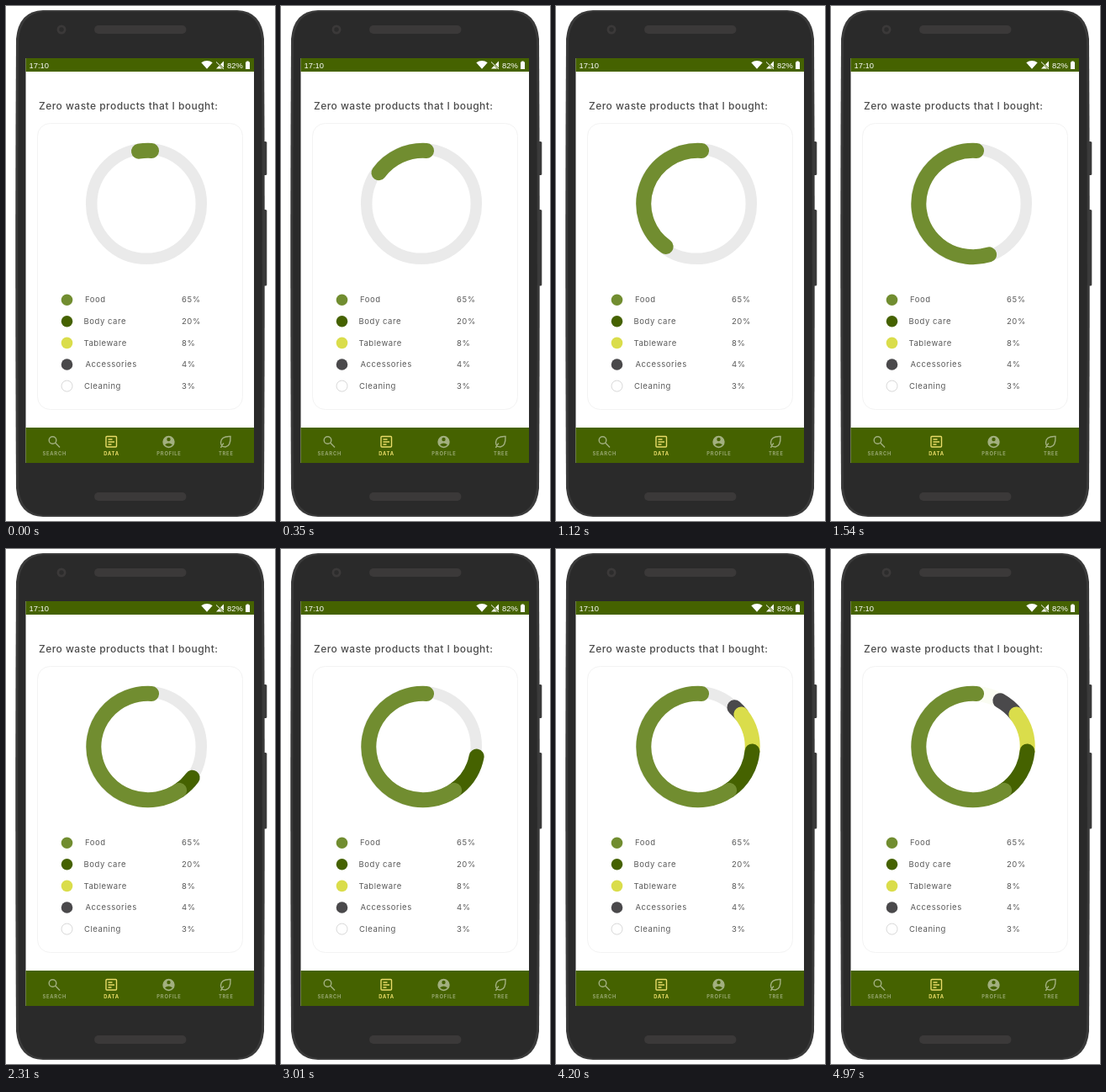
Write an HTML page that moves like this. It is 320 px wide and 612 px high and loops after 5.04 s.

```html
<!DOCTYPE html>
<html lang="en">
<head>
<meta charset="utf-8">
<title>Zero waste chart</title>
<style>
  html, body { margin: 0; width: 100%; height: 100%; overflow: hidden; background: #fff; }
  svg { display: block; width: 100vw; height: 100vh; }
  text { font-family: Inter, sans-serif; }
  .title { font-size: 12px; font-weight: 500; letter-spacing: .47px; fill: #4c4c4c; }
  .row { font-size: 9.5px; letter-spacing: .55px; fill: #5a5a5a; }
  .status text { font: 9.4px "Liberation Sans", Arial, sans-serif; fill: #fff; }
  .nav text { font-size: 5.8px; font-weight: 600; letter-spacing: .8px; text-anchor: middle; }
  .nav g { fill: none; stroke: #a2b07f; stroke-width: 1.4; }
  .nav g.on { stroke: #e9dc68; }
  .nav text, .nav .solid { fill: #a2b07f; stroke: none; }
  .nav .on text { fill: #e9dc68; stroke: none; font-weight: 700; }
  #arcs path { fill: none; stroke-width: 18; stroke-linecap: round; }
</style>
</head>
<body>
<svg viewBox="0 0 320 612">
  <!-- phone -->
  <g fill="#3a3a3a">
    <rect x="304" y="161" width="6.300" height="40" rx="1.500"/>
    <rect x="304" y="242" width="6.300" height="90.500" rx="1.500"/>
    <path d="M44 5H275Q304 6 307 39Q308.500 306 307 573Q304 606 275 607H44Q15 606 12 573Q10.500 306 12 39Q15 6 44 5Z"/>
  </g>
  <path fill="#2a2a2a" d="M45 7H274Q301 8 304 40Q305.500 306 304 572Q301 604 274 605H45Q18 604 15 572Q13.500 306 15 40Q18 8 45 7Z"/>
  <g fill="#3b3939">
    <rect x="105" y="23" width="109.500" height="10" rx="5"/>
    <rect x="105" y="578" width="109.500" height="10" rx="5"/>
    <circle cx="66" cy="28" r="5.500"/>
  </g>
  <circle cx="66" cy="28" r="2.700" fill="#2c2c2c"/>

  <!-- screen -->
  <rect x="23.500" y="62" width="271.500" height="481" fill="#fff"/>
  <path fill="#456200" d="M23.500 62H295V78H23.500ZM23.500 501H295V543H23.500Z"/>
  <g class="status">
    <text x="27.500" y="74">17:10</text>
    <text x="263" y="73.500">82%</text>
    <path fill="#fff" d="M232.300 67.300Q239 62.800 245.700 67.300L239 74.800Z"/>
    <path fill="#fff" d="M259 65.500V74.500H250Z"/>
    <path stroke="#456200" stroke-width="2" d="M250 66L260 76"/>
    <path stroke="#fff" d="M250 66.500L259 75"/>
    <path fill="#fff" d="M286.300 65.500H288.700V66.500H290V75H285V66.500H286.300Z"/>
  </g>

  <text class="title" x="39" y="123">Zero waste products that I bought:</text>
  <rect x="37.500" y="139.500" width="244" height="340" rx="15" fill="#fff" stroke="#f3f3f3"/>

  <!-- chart -->
  <circle cx="167" cy="235" r="65.300" fill="none" stroke="#eaeaea" stroke-width="13.500"/>
  <g id="arcs"></g>
  <g id="legend"></g>

  <!-- navigation -->
  <g class="nav">
    <g><circle cx="55.500" cy="516" r="4.300"/><path d="M58.600 519.100L64 524.500"/><text x="57.800" y="534.300">SEARCH</text></g>
    <g class="on"><rect x="119" y="511.500" width="12.500" height="12.500" rx="1"/><path d="M121.500 515H126.500M121.500 518H129M121.500 521H125.500"/><text x="125.500" y="534.300">DATA</text></g>
    <g><circle class="solid" cx="193.500" cy="518" r="7.200"/>
      <path fill="#456200" stroke="none" d="M189 521.200Q193.500 517.700 198 521.200Q193.500 526 189 521.200Z"/>
      <circle cx="193.500" cy="515" r="2.200" fill="#456200" stroke="none"/><text x="194" y="534.300">PROFILE</text></g>
    <g><path d="M267 511.500Q256 511 255.500 518.500Q255.500 524 261 524Q267.500 523 267 511.500ZM255.500 525Q256.500 522 259 519.500"/><text x="261.800" y="534.300">TREE</text></g>
  </g>
</svg>
<script>
  const NS = "http://www.w3.org/2000/svg";
  const STEP = 70, STEPS = 72, HOLDS = [12, 42, 65];

  // label, share, label x, colour, start angle, end angle, first step, last step
  const items = [
    ["Food", "65%", 94, "#718d30", -3.6, 215, -1.5, 23],
    ["Body care", "20%", 92.5, "#456200", 215, 265, 25, 43],
    ["Tableware", "8%", 92.5, "#dadd4b", 265, 307.5, 43, 54.6],
    ["Accessories", "4%", 94.5, "#4a494b", 307.5, 330, 54.6, 62],
    ["Cleaning", "3%", 93, "#fafcf2", 330, 356.4, 62, 68]
  ];

  function add(parent, tag, attrs, text) {
    const el = document.createElementNS(NS, tag);
    for (const k in attrs) el.setAttribute(k, attrs[k]);
    if (text) el.textContent = text;
    return parent.appendChild(el);
  }

  // Angles run counterclockwise from the top.
  function point(deg) {
    const a = deg * Math.PI / 180;
    return (169 - 64.7 * Math.sin(a)).toFixed(2) + " " + (235 - 63.2 * Math.cos(a)).toFixed(2);
  }
  const arc = (a, b) => `M${point(a)}A64.7 63.2 0 ${b - a > 180 ? 1 : 0} 0 ${point(b)}`;

  const arcs = document.getElementById("arcs");
  const legend = document.getElementById("legend");
  const paths = items.map(([, , , colour]) => {
    const p = add(arcs, "path", { stroke: colour });
    arcs.prepend(p); // earlier arcs lie on top
    return p;
  });

  items.forEach(([label, share, x, colour], i) => {
    const y = 349 + i * 25.6, white = i === 4;
    add(legend, "circle", {
      cx: 72.5, cy: y + .2, r: white ? 6.5 : 6.8,
      fill: white ? "#fff" : colour, stroke: white ? "#d9d9d9" : "none"
    });
    add(legend, "text", { class: "row", x, y: y + 3.4 }, label);
    add(legend, "text", { class: "row", x: 209, y: y + 3.4 }, share);
  });

  function draw(now) {
    const step = Math.floor(now / STEP) % STEPS;
    const pos = step - HOLDS.filter(h => step >= h).length;
    items.forEach(([, , , , from, to, t0, t1], i) => {
      const p = Math.min(1, (pos - t0) / (t1 - t0));
      paths[i].setAttribute("d", p > 0 ? arc(from, from + (to - from) * p) : "");
    });
  }

  const start = performance.now();
  function tick() {
    draw(performance.now() - start);
    requestAnimationFrame(tick);
  }
  tick();
</script>
</body>
</html>
```
